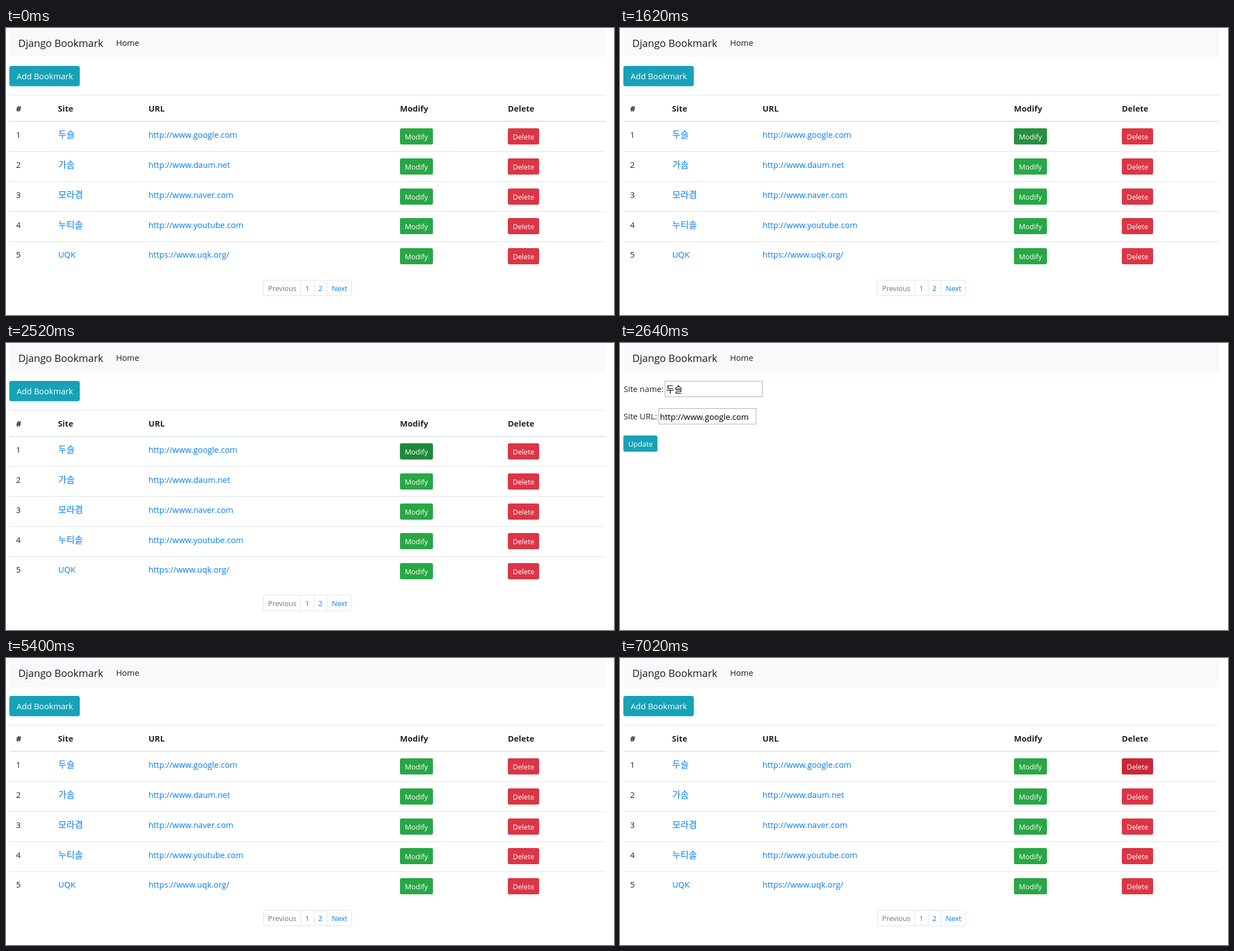
Write an HTML page that moves like this. It is 1088 px wide and 515 px high and loops after 8000 ms.

```html
<!DOCTYPE html>
<html lang="ko">
<head>
<meta charset="utf-8">
<title>Bookmark list</title>
<style>
  html, body { margin: 0; width: 100%; height: 100%; overflow: hidden; background: #fff; }
  svg { display: block; width: 100%; height: 100%; }
  text { font: 14.6px "Open Sans", "Noto Sans CJK KR", "Noto Sans CJK", sans-serif; fill: #212529; }
  .brand { font-size: 18.2px; }
  .small { font-size: 12.8px; }
  .bold { font-weight: 700; }
  .korean { font: 16px "Noto Sans CJK KR", "Noto Sans CJK", sans-serif; }
</style>
</head>
<body>
<svg id="stage" viewBox="0 0 1088 515">
  <rect x="6" width="1066.5" height="52" fill="#f8f9fa"/>
  <g id="list"></g>
  <g id="form" visibility="hidden"></g>
</svg>
<script>
const LOOP = 8000;
const LINK = '#007bff', LINE = '#dee2e6', INFO = '#17a2b8', GREEN = '#28a745', RED = '#dc3545';
const ROW_HEIGHT = 53.8;
const rows = [
  ['두슬', 'http://www.google.com'],
  ['가솜', 'http://www.daum.net'],
  ['모라겸', 'http://www.naver.com'],
  ['누티솔', 'http://www.youtube.com'],
  ['UQK', 'https://www.uqk.org/']
];

const stage = document.getElementById('stage');
const list = document.getElementById('list');
const form = document.getElementById('form');

function add(parent, tag, attrs) {
  const node = document.createElementNS('http://www.w3.org/2000/svg', tag);
  for (const key in attrs) node.setAttribute(key, attrs[key]);
  return parent.appendChild(node);
}

function label(parent, x, y, words, color = '#212529', cls = '') {
  const node = add(parent, 'text', { x, y, class: cls });
  node.style.fill = color;
  node.textContent = words;
}

function box(parent, x, y, width, height, fill, rx = 0) {
  return add(parent, 'rect', { x, y, width, height, fill, rx });
}

function smallButton(parent, x, y, width, words, color) {
  const rect = box(parent, x, y, width, 29, color, 3);
  label(parent, x + 8.8, y + 20, words, '#fff', 'small');
  return rect;
}

function input(x, y, value, cls) {
  add(form, 'rect', { x, y, width: 174, height: 28, fill: '#fff', stroke: '#b0b0b0' });
  label(form, x + 2, y + 20, value, '#000', cls);
}

label(stage, 22, 34, 'Django Bookmark', '#1a1a1a', 'brand');
label(stage, 197, 32, 'Home', '#1a1a1a');

// Bookmark list
box(list, 6, 68, 126, 36.5, INFO, 4);
label(list, 19, 92, 'Add Bookmark', '#fff');
box(list, 6, 120, 1066.5, 1, LINE);
box(list, 6, 166.6, 1066.5, 1.9, LINE);
[['#', 18], ['Site', 93], ['URL', 255], ['Modify', 705], ['Delete', 898]]
  .forEach(([words, x]) => label(list, x, 150, words, '#212529', 'bold'));

const ring = add(list, 'rect', { fill: '#28a745' });
const modify = [], remove = [];
rows.forEach(([site, url], i) => {
  const offset = i * ROW_HEIGHT;
  const baseline = Math.round(197.2 + offset);
  const top = Math.round(180 + offset);
  if (i) box(list, 6, Math.floor(168 + offset), 1066.5, 1, LINE);
  label(list, 18, baseline, i + 1);
  label(list, 93.5, baseline, site, LINK, i < 4 ? 'korean' : '');
  label(list, 255, baseline, url, LINK);
  modify.push(smallButton(list, 705, top, 59, 'Modify', GREEN));
  remove.push(smallButton(list, 898, top, 56, 'Delete', RED));
});

add(list, 'rect', { x: 460.5, y: 452.5, width: 158, height: 28, rx: 3, fill: '#fff', stroke: LINE });
[527, 551, 574].forEach(x => box(list, x, 452, 1, 29, LINE));
label(list, 469, 472, 'Previous', '#6c757d', 'small');
label(list, 535.5, 472, '1', '#4a7aae', 'small');
label(list, 559, 472, '2', LINK, 'small');
label(list, 583, 472, 'Next', LINK, 'small');

// Edit form
label(form, 6.5, 88, 'Site name:');
input(80.5, 68.5, rows[0][0], 'korean');
label(form, 6.5, 137, 'Site URL:');
input(69.5, 117.5, rows[0][1], '');
smallButton(form, 6, 166, 61, 'Update', INFO);

// Each step: start time, highlighted button, its colour, focus ring spread and opacity
const steps = [
  { at: 0 },
  { at: 1080, button: remove[4], color: '#d43140' },
  { at: 1620, button: modify[0], color: '#24913f' },
  { at: 2520, button: modify[0], color: '#218838', spread: 0.6, glow: 0.18 },
  { at: 2580, button: modify[0], color: '#1e7e34', spread: 1.6, glow: 0.4 },
  { at: 2640, editing: true },
  { at: 5400 },
  { at: 6360, button: modify[2], color: '#27a243' },
  { at: 6960, button: remove[0], color: '#d43040' },
  { at: 7020, button: remove[0], color: '#c92736' }
];

let shown;
function show(step) {
  if (step === shown) return;
  shown = step;
  list.setAttribute('visibility', step.editing ? 'hidden' : 'visible');
  form.setAttribute('visibility', step.editing ? 'visible' : 'hidden');
  modify.forEach(rect => rect.setAttribute('fill', GREEN));
  remove.forEach(rect => rect.setAttribute('fill', RED));
  if (step.button) step.button.setAttribute('fill', step.color);
  const spread = step.spread || 0;
  const shape = { x: 705 - spread, y: 180 - spread, width: 59 + 2 * spread,
    height: 29 + 2 * spread, rx: 3 + spread, opacity: step.glow || 0 };
  for (const key in shape) ring.setAttribute(key, shape[key]);
}

const start = performance.now();
function tick(now) {
  const time = Math.max(0, now - start) % LOOP;
  show(steps.filter(step => step.at <= time).pop());
  requestAnimationFrame(tick);
}
show(steps[0]);
requestAnimationFrame(tick);
</script>
</body>
</html>
```
